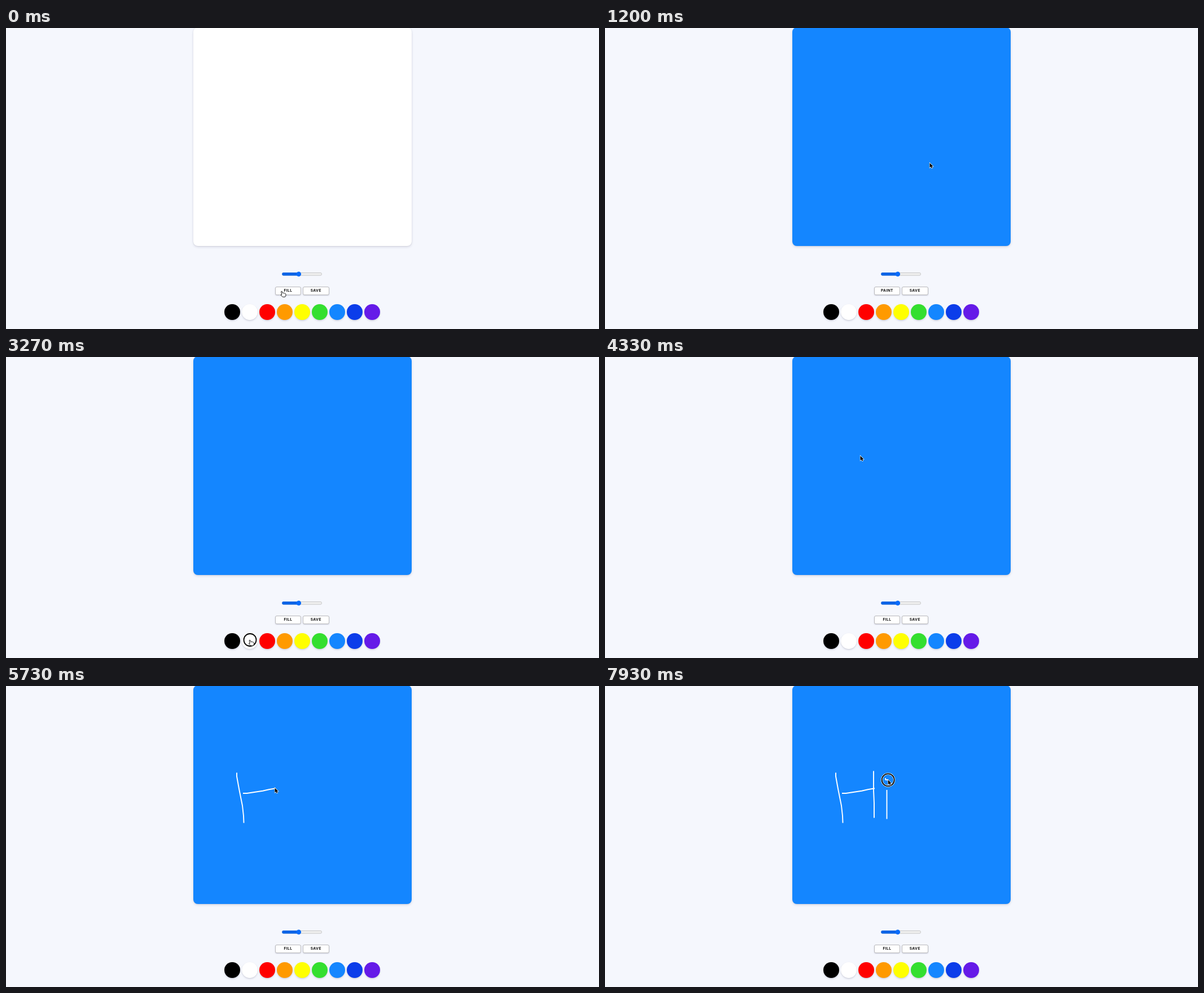
Recreate the animation shown at these times as an HTML page. Size 1051 by 533 pixels, loop 8000 ms.

```html
<!DOCTYPE html>
<html lang="en">
<head>
<meta charset="utf-8">
<title>Paint board</title>
<style>
  html, body { margin: 0; width: 100%; height: 100%; overflow: hidden; background: #f5f7fd; }
  body > * { position: absolute; box-sizing: border-box; }
  #board {
    left: 331.5px; top: -1px; width: 387px; height: 387px; border-radius: 8px; background: #fff;
    box-shadow: 0 2px 4px rgba(50, 50, 93, .13), 0 .5px 2px rgba(0, 0, 0, .1);
  }
  .button {
    top: 457.5px; width: 46.5px; height: 15px; border: 1px solid #b9b9bb; border-radius: 3px;
    background: #fff; box-shadow: 0 1px 2px rgba(50, 50, 93, .2);
    font: 700 6.6px/13px Inter, sans-serif; letter-spacing: .4px; text-align: center; color: #111;
  }
  .swatch {
    top: 488.5px; width: 28px; height: 28px; border-radius: 50%;
    box-shadow: 0 2px 3px rgba(50, 50, 93, .13), 0 .5px 1.5px rgba(0, 0, 0, .1);
  }
  svg { left: 0; top: 0; }
</style>
</head>
<body>
<div id="board"></div>
<div class="button" id="mode" style="left:476.7px">FILL</div>
<div class="button" style="left:526px">SAVE</div>
<svg width="1051" height="533" viewBox="0 0 1051 533">
  <rect x="489.5" y="433.4" width="70" height="4.7" rx="2.3" fill="#efefef" stroke="#b2b2b2" stroke-width=".7"/>
  <rect x="489.2" y="433" width="30" height="5.4" rx="2.7" fill="#0a64e6"/>
  <circle cx="518.8" cy="435.7" r="4.3" fill="#0a6cfa"/>
  <path id="ink" fill="none" stroke="#fff" stroke-width="1.9" stroke-linejoin="round"/>
  <g id="cursor">
    <g id="ring" fill="none">
      <circle r="11" stroke="#fff" stroke-width="3.2"/>
      <circle r="11" stroke="#000" stroke-width="1.8"/>
    </g>
    <path id="arrow" d="M0 0V8.2L1.9 6.5 3.3 9.3 4.8 8.6 3.5 6 6 5.9Z"
          stroke="#fff" stroke-width="1.2" paint-order="stroke"/>
    <path id="hand" fill="#fff" stroke="#000" stroke-width=".9" stroke-linejoin="round"
          d="M-1.4 .9Q-1 -.3 .3 .5L1.5 3.4Q3 2.6 3.6 3.6Q5 3 5.4 4.1Q6.8 4 6.9 5.5L7 8 5.6 10.2H1.4L-2 7Q-2.2 5.4 -.2 6.1Z"/>
  </g>
</svg>
<script>
const LOOP = 8000, STEP = 1000 / 15;
const UP = 0, PRESS = 1, DRAW = 2;
const BLUE = '#1486ff';

// Pointer path: time in ms, x, y, and the button state until the next point.
const path = [
  [0, 489, 466, UP], [66, 489, 466, PRESS], [200, 489, 466, UP],
  [730, 587, 501, UP], [800, 587, 501, PRESS], [933, 587, 501, UP],
  [1066, 575.5, 239, PRESS], [1200, 575.5, 239, UP], [1333, 575.5, 239, UP],
  [1866, 493, 462, UP], [1933, 493, 461, PRESS], [2066, 493, 461, UP],
  [2133, 493.5, 460, UP], [2200, 493.5, 460, UP],
  [3066, 432, 502, UP], [3133, 432.5, 501, UP], [3266, 432.5, 501, PRESS], [3400, 432.5, 501, UP],
  [4066, 482, 172, UP], [4333, 452.5, 175, UP], [4533, 409, 153.5, PRESS],
  [4600, 409, 153.5, DRAW], [4640, 409, 160, DRAW], [4720, 413, 182, DRAW],
  [4810, 419, 212, DRAW], [4870, 421, 230, DRAW], [4920, 421.5, 242.5, PRESS],
  [5000, 421.5, 242.5, UP], [5266, 420, 190, UP], [5333, 420, 190, PRESS],
  [5466, 420, 190, DRAW], [5495, 427, 190, DRAW], [5540, 440, 188, DRAW],
  [5590, 455, 185.7, DRAW], [5625, 466, 183.2, DRAW], [5660, 478, 181.3, PRESS],
  [5733, 476.5, 180.5, UP], [6066, 476, 150.5, UP], [6133, 476, 150.5, PRESS],
  [6200, 476, 150.5, DRAW], [6340, 476, 185, DRAW], [6433, 477, 208, DRAW],
  [6533, 477, 233.5, PRESS], [6600, 477, 233.5, UP], [6800, 499.5, 184, PRESS],
  [6866, 499.5, 184, DRAW], [7066, 499.5, 225, DRAW], [7200, 499.5, 235.5, PRESS],
  [7266, 499.5, 235.5, UP], [7600, 497, 163, PRESS], [7680, 497, 163, DRAW],
  [7733, 497.3, 166, DRAW], [7820, 501.7, 166.3, PRESS], [8000, 501.7, 166.3, UP]
];

const byId = id => document.getElementById(id);
const mix = (a, b, k) => a + (b - a) * k;
const show = (id, visible) => byId(id).setAttribute('visibility', visible ? 'visible' : 'hidden');

const swatchX = i => 401 + i * 30.95;
const colors = ['#000', '#fff', '#f00', '#ff9a00', '#ff0', '#34df2f', BLUE, '#0c3dea', '#651ae8'];
colors.forEach((color, i) => {
  const swatch = document.createElement('div');
  swatch.className = 'swatch';
  swatch.style.cssText = `left:${swatchX(i) - 14}px;background:${color}`;
  document.body.insertBefore(swatch, document.querySelector('svg'));
});

function segmentPoint(a, b, t) {
  let k = Math.min(1, (t - a[0]) / (b[0] - a[0]));
  if (a[3] === UP) k = k * k * (3 - 2 * k);
  return [mix(a[1], b[1], k), mix(a[2], b[2], k)];
}

function inkPath(t) {
  let d = '';
  path.forEach((a, i) => {
    if (a[3] !== DRAW || a[0] >= t) return;
    if (path[i - 1][3] !== DRAW) d += `M${a[1]} ${a[2]}`;
    d += 'L' + segmentPoint(a, path[i + 1], t).join(' ');
  });
  return d;
}

function isClickable(x, y) {
  const onButton = y > 457 && y < 473 && x > 476 && x < 573;
  return onButton || colors.some((_, i) => Math.hypot(x - swatchX(i), y - 502.5) < 14);
}

function render(t) {
  const next = path.findIndex(p => p[0] > t);
  const from = path[next - 1];
  const [x, y] = segmentPoint(from, path[next], t);
  const hand = isClickable(x, y);
  byId('cursor').setAttribute('transform', `translate(${x} ${y})`);
  show('ring', from[3] !== UP);
  show('hand', hand);
  show('arrow', !hand);
  byId('ink').setAttribute('d', inkPath(t - STEP)); // ink trails the pointer by one step
  byId('mode').textContent = t >= 200 && t < 2066 ? 'PAINT' : 'FILL';
  byId('board').style.background = t >= 1200 ? BLUE : '#fff';
}

const start = performance.now();
function tick() {
  const t = (performance.now() - start) % LOOP;
  render(Math.floor((t + 4) / STEP) * STEP % LOOP);
  requestAnimationFrame(tick);
}
tick();
</script>
</body>
</html>
```
